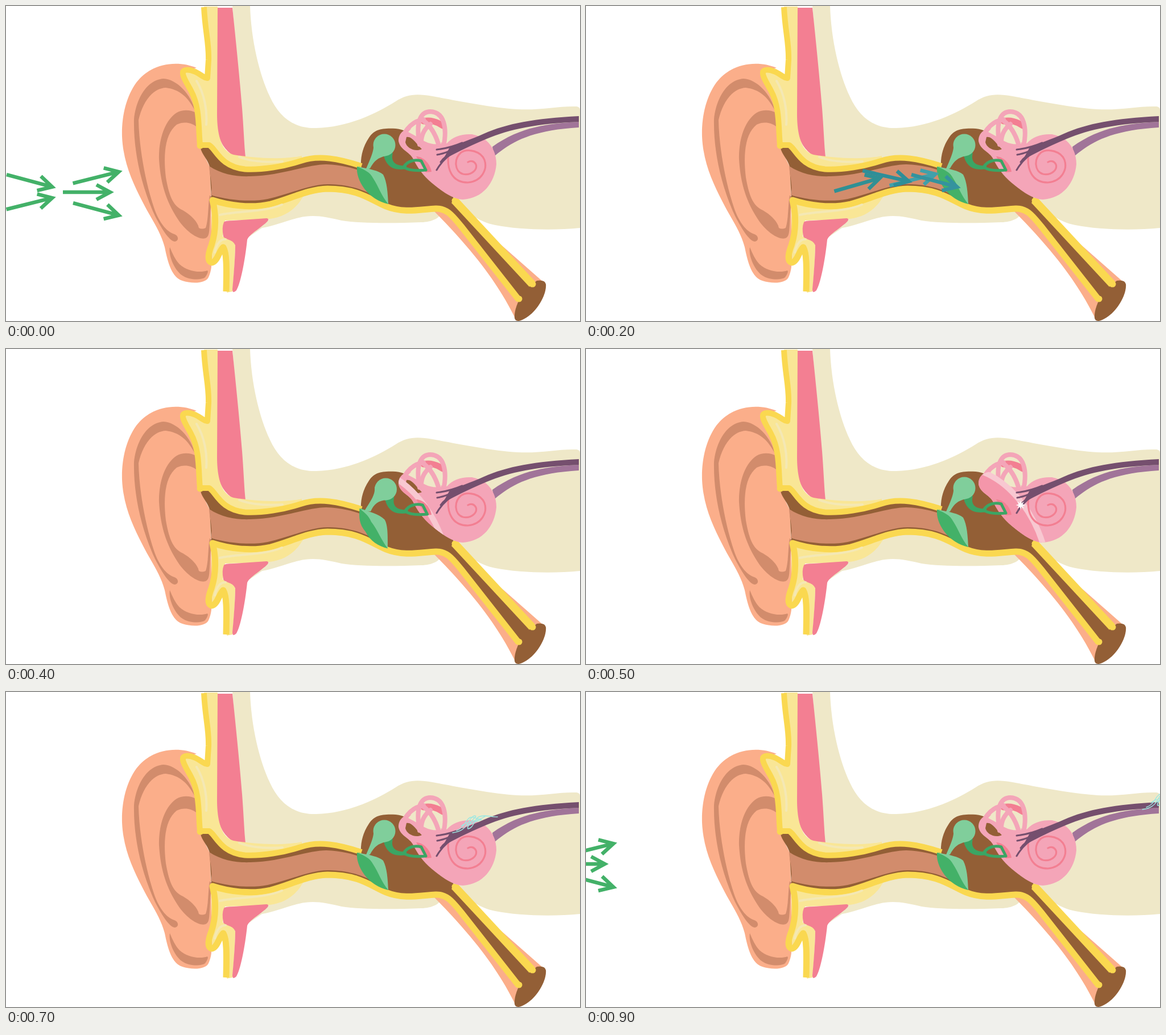
Recreate the animation shown at these times as an HTML page. Size 1009 by 555 pixels, loop 1000 ms.

```html
<!DOCTYPE html>
<html lang="en">
<head>
<meta charset="utf-8">
<title>How sound travels through the ear</title>
<style>
  html, body { margin: 0; width: 100%; height: 100%; overflow: hidden; background: #fff; }
  svg { display: block; width: 100vw; height: 100vh; }
  .line { fill: none; stroke-linecap: round; stroke-linejoin: round; }
  .yellow { stroke: #fad850; stroke-width: 11; }
  .shine { stroke: #f4e8b4; stroke-width: 4; }
  .loop { stroke: #f4a5b8; stroke-width: 8; }
  .nerve { stroke: #754f6e; stroke-width: 3; }
  .spark { stroke: #9de8e2; stroke-width: 1.4; }
</style>
</head>
<body>
<svg viewBox="0 0 1009 555" preserveAspectRatio="none">
  <defs>
    <path id="body" d="M690 238C690 222 702 215 715 217C733 222 748 240 775 242C785 230 801 225 819 226C848 231 862 253 862 279C859 312 838 339 803 341C787 340 770 329 755 317C738 304 726 290 716 270C710 257 693 254 690 238Z"/>
    <clipPath id="inBody"><use href="#body"/></clipPath>
  </defs>

  <!-- bone and muscle -->
  <path fill="#efe8c8" d="M398 0H429C431 60 445 120 464 160C480 195 505 216 545 215C600 214 650 190 685 168C705 155 722 154 750 159C790 166 850 179 900 182C940 184 970 176 1003 177Q1009 178 1009 183V391C960 396 900 394 860 386C845 383 835 378 826 373L764 364C765 372 750 381 730 381C680 383 620 383 590 378C560 371 540 367 515 373C490 379 470 388 450 391L425 408L419 265Z"/>
  <path fill="#f37f92" d="M371 3H398C404 60 412 140 415 180C418 220 419 250 421 266L400 264C378 250 368 225 370 190Z"/>
  <path fill="#f9e696" d="M348 1H372L371 190C371 225 378 256 400 262C430 267 485 272 520 264L520 280L430 292L380 278L341 246L338 190L312 116L330 112L350 128L355 100Z"/>
  <path fill="#f9e696" d="M363 342L440 349L528 324C512 362 485 374 455 376L385 378L381 406C395 412 404 415 403 425C402 460 400 480 398 503L388 505L384 426L362 450L357 435Z"/>
  <path fill="#f37f92" d="M383 381Q384 378 400 378L458 374Q465 375 456 383C436 399 427 404 424 412C420 450 412 490 405 501Q398 508 398 499C400 480 403 440 403 422C400 411 385 412 382 406Q379 390 383 381Z"/>

  <!-- outer ear -->
  <path fill="#fbae8a" d="M335 109C302 95 255 100 229 135C211 160 203 195 204 230C206 275 222 310 240 345C255 375 271 395 279 425C285 455 292 478 310 484C325 489 350 490 356 478C362 465 361 455 362 445L360 333L359 285L342 250L338 180C336 160 318 140 311 115Z"/>
  <g fill="#d28c6c">
    <path d="M333 186C325 155 300 129 277 128C247 130 228 165 225 200C224 260 239 320 262 370C275 395 288 415 297 415C304 414 304 405 296 402C285 399 270 385 260 355C245 310 234 250 233 201C240 170 257 145 281 144C305 147 320 160 333 186Z"/>
    <path d="M334 188C324 183 311 182 300 188C277 203 268 240 269 270C272 320 285 350 305 380C320 400 340 413 351 409C357 406 357 400 358 385L361 335L358 334C355 350 356 378 351 391Q344 394 339 391C337 380 325 368 311 360C292 352 286 330 281 302C276 260 280 225 300 209C312 203 325 205 334 212Z"/>
    <path d="M288 425C285 440 297 468 312 476C325 484 345 482 350 478Q357 468 354 466C340 471 318 467 305 455C298 448 292 435 288 425Z"/>
  </g>

  <!-- tube, middle ear and canal -->
  <path fill="#fbae8a" d="M752 361L790 350L943 485L895 550C870 500 835 445 752 361Z"/>
  <g fill="#935f36">
    <path d="M624 285C623 268 626 250 638 232C648 217 660 215 685 216C700 217 710 225 728 234L770 300L790 346L927 492L901 517L785 372Q772 353 755 354C735 354 720 360 695 358C670 355 660 344 640 332Z"/>
    <path d="M933 484Q947 482 949 490C951 510 930 545 905 554Q896 557 894 550C893 535 901 515 915 499Z"/>
    <path d="M342 249L358 247C376 280 400 287 430 288C480 289 520 268 555 268C580 268 605 277 626 283L660 348C630 330 600 320 565 321C530 321 500 342 460 350C430 356 390 350 361 339L358 283C354 270 348 266 343 254Z"/>
  </g>
  <path fill="#d28c6c" d="M357 282C380 297 405 301 430 300C480 300 530 279 563 279C590 280 608 285 625 291L652 337C620 318 590 314 565 314C535 314 500 331 460 340C430 346 390 342 360 333C364 315 358 300 357 282Z"/>

  <!-- skin lining -->
  <g class="line yellow" style="stroke-linecap:butt">
    <path stroke-width="10" d="M348 2C350 45 357 65 356 95L354 127C347 127 340 118 330 115C321 111 311 112 311 117C310 124 318 136 325 149C341 178 338 215 341 245L357 245C369 251 376 283 420 287.5C450 289 488 283 518 273C550 262 585 269 625 282"/>
    <path d="M387 503C388 460 388 435 382 425C374 432 372 450 362 452C352 450 357 432 361 422C370 395 369 365 363 342C390 351 430 357 465 349C500 340 530 323 565 322C620 322 640 341 668 353C700 366 730 358 755 357C775 356 785 370 800 388L901 517"/>
    <path style="stroke-width:14" d="M788 342L925 490"/>
    <path style="stroke-linecap:round" d="M341 246h1M901 516h1M789 343h1M925 490h1"/>
  </g>
  <g class="line shine">
    <path d="M335 132C349 155 354 185 352 209M410 266C430 274 455 276 486 274M376 368C410 361 455 363 485 350M367 434C370 420 376 411 386 411"/>
  </g>

  <!-- inner ear -->
  <path fill="#a17499" d="M1007 204C955 207 905 212 855 248L858 265C890 238 925 219 1007 214Z"/>
  <use href="#body" fill="#f4a5b8"/>
  <path fill="#935f36" d="M704 231C714 229 722 244 731 252C719 258 704 250 702 240Z"/>
  <path fill="#efe8c8" d="M707 222C720 206 745 202 760 222L765 243C745 246 733 237 722 230Z"/>
  <path class="line" stroke="#f37f92" stroke-width="11" d="M734 203C745 200 758 204 768 211"/>
  <g class="line loop">
    <path d="M727 244C719 200 731 186 746 186C770 187 776 214 769 248"/>
    <path d="M695 238C702 214 718 202 734 200M734 202C747 212 757 230 762 250M730 240C730 222 741 212 746 208"/>
  </g>
  <g id="wave" clip-path="url(#inBody)">
    <path id="front" class="line" style="fill:#f496aa" stroke="#f8c8d1" stroke-width="10"/>
  </g>
  <path class="line" stroke="#f37f92" stroke-width="3.2" d="M778 259C774 288 784 311 812 311C836 309 847 288 841 271C835 256 812 250 800 258C787 269 788 291 803 296C819 299 829 288 826 279C823 273 817 272 812 275"/>
  <path fill="#f37f92" d="M721 265C736 266 746 280 748 292L738 293Z"/>
  <path fill="#754f6e" d="M1007 194C930 198 880 207 840 225C815 236 797 242 780 249L768 271C792 258 816 246 845 234C885 217 935 207 1007 204Z"/>
  <path class="line nerve" d="M802 241C788 247 775 251 757 253M800 245C785 254 772 260 758 262M795 253C778 262 765 275 757 289M795 253C781 259 770 266 764 275"/>

  <!-- eardrum and ossicles -->
  <path id="drumDark" fill="#43b168"/>
  <path id="drumLight" fill="#80ce9b"/>
  <g id="bones">
    <path class="line" stroke="#3ba564" stroke-width="5" d="M699 284C705 273 718 270 730 273L738 289C720 291 708 290 699 284Z"/>
    <path fill="#3ba564" d="M663 259H680C676 273 683 283 704 281V287C680 291 667 282 663 259Z"/>
    <circle cx="665" cy="245" r="19.5" fill="#80ce9b"/>
  </g>
  <path id="handle" fill="#80ce9b"/>

  <g id="arrows" class="line" stroke-width="6.5" style="stroke-linecap:butt;stroke-linejoin:miter"></g>
  <path id="star" fill="#fff"/>
  <path id="spark" class="line spark" d="M785 248C800 246 807 240 812 231C818 220 823 216 826 219C818 228 809 238 812 241C822 240 824 223 831 220C842 215 852 221 864 220M792 244C806 240 808 224 816 221C823 219 828 224 836 225C825 228 817 233 808 235M800 236C813 226 829 229 842 219"/>
</svg>
<script>
const el = id => document.getElementById(id);
const set = (id, attrs) => { for (const k in attrs) el(id).setAttribute(k, attrs[k]); };
const STEP = 100, STEPS = 10;
const GREEN = '#43b168', TEAL = '#43ae90', PINE = '#378e76';

// Each arrow: tip x, tip y, angle in degrees, colour
const fan = (dx, dy) => [[203, 291, -14], [188, 328, 0], [203, 370, 15]]
  .map(([x, y, a]) => [x + dx, y + dy, a, GREEN]);
const flights = {
  0: [[86, 320, 15, GREEN], [86, 337, -14, GREEN], ...fan(0, 0)],
  1: [[349, 292, 14, TEAL], [342, 321, -15, PINE], [447, 320, 14, '#37988a'],
      [428, 324, 0, TEAL], [517, 304, -15, TEAL]],
  2: [[521, 302, -16, '#309094'], [619, 295, -14, '#40a0aa'],
      [572, 310, 13, '#2f8e98'], [657, 320, 15, '#34939e']],
  3: [[586, 297, -14, '#3c62a3'], [655, 320, 15, '#4472c4'],
      [653, 292, -14, '#2f5a96'], [620, 307, 14, '#4680d0']],
  9: fan(-150, -25)
};
const push = [0, 0, 0, 1, .5, 0, 0, 0, 0, 0];
const waveShift = { 4: -34, 5: 0, 6: 28 };
const starAt = { 5: [764, 275], 6: [784, 257] };
const sparkAt = { 7: [0, 0], 8: [97, -32], 9: [193, -41] };

const arrow = ([x, y, a, c]) =>
  `<path stroke="${c}" transform="translate(${x} ${y}) rotate(${a})" d="M-88 0H-6M-29 -13L-5 0L-29 13"/>`;

function starPath([x, y]) {
  const pts = Array.from({ length: 16 }, (_, i) => {
    const r = i % 2 ? 3.6 : 8.5, a = i * Math.PI / 8;
    return `${x + r * Math.sin(a)} ${y - r * Math.cos(a)}`;
  });
  return `M${pts.join('L')}Z`;
}

// The wave front, closed around everything it has already passed
const frontPath = dx =>
  `M${690 + dx} 214C${744 + dx} 232 ${786 + dx} 286 ${804 + dx} 346L600 400V200Z`;

function drawDrum(p) {
  const x = 617 + 9 * p, y = 283 - 4 * p, b = 349 + 5 * p, e = 672 - 2 * p;
  set('drumDark', { d: `M${x} ${y}C${x + 10} ${y} 640 290 ${647 + 2 * p} 298C655 315 667 334 ${e} ${b}C655 ${b - 4} 640 ${335 + 7 * p} ${630 + 4 * p} 322C620 308 ${x - 1} 295 ${x} ${y}Z` });
  set('drumLight', { d: `M${x} ${y}C640 ${287 + p} 655 290 ${663 + 5 * p} ${297 + 7 * p}C${670 + 3 * p} 310 671 330 ${e} ${b}C${660 - 3 * p} 335 ${655 - 4 * p} 318 ${645 - 6 * p} ${303 + 3 * p}C${640 - 5 * p} 293 ${630 - p} 288 ${x} ${y}Z` });
  const hx = 646 + 4 * p, hy = 240 + 5 * p;
  set('handle', { d: `M${hx} ${hy}C${hx + 2} ${hy + 15} ${640 - 2 * p} 270 ${632 - 4 * p} ${289 - 7 * p}L${640 + 2 * p} 286C647 273 654 267 ${668 + 4 * p} ${264 + 4 * p}Z` });
  set('bones', { transform: `translate(${5 * p} ${4 * p})` });
}

const show = (id, on) => { el(id).style.display = on ? '' : 'none'; };
let last = -1;

function render(ms) {
  const k = Math.floor(ms / STEP) % STEPS;
  if (k === last) return;
  last = k;
  drawDrum(push[k]);
  el('arrows').innerHTML = (flights[k] || []).map(arrow).join('');
  show('wave', k in waveShift);
  if (k in waveShift) set('front', { d: frontPath(waveShift[k]) });
  show('star', k in starAt);
  if (starAt[k]) set('star', { d: starPath(starAt[k]) });
  show('spark', k in sparkAt);
  if (sparkAt[k]) set('spark', { transform: `translate(${sparkAt[k]})` });
}

// The brown opening sits under the wave tint, so the tint must skip it
const start = performance.now();
function loop() {
  render(performance.now() - start);
  requestAnimationFrame(loop);
}
loop();
</script>
</body>
</html>
```
